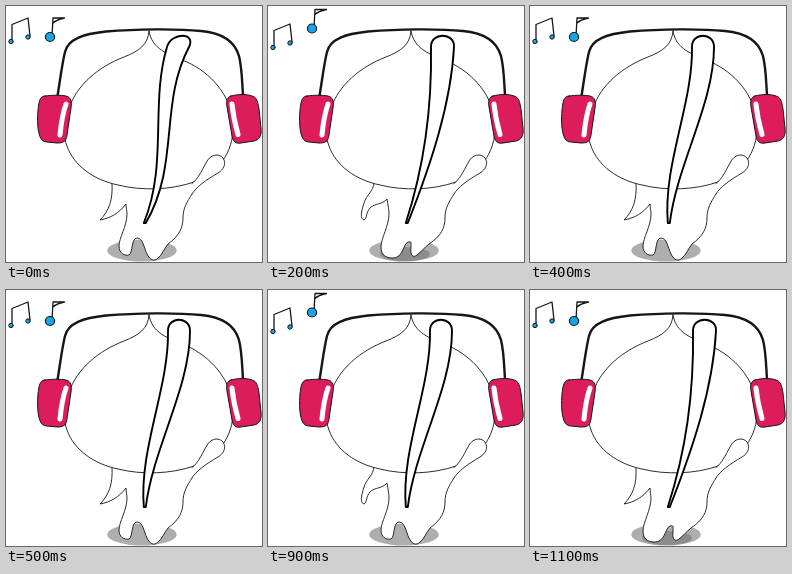
An HTML page with a canvas that plays this animation: 256 by 256 pixels, repeating every 1.2 s.

```html
<!DOCTYPE html>
<html lang="en">
<head>
<meta charset="utf-8">
<title>Dancing onion with headphones</title>
<style>
html, body { margin: 0; width: 100%; height: 100%; overflow: hidden; background: #fff; }
canvas { display: block; width: 256px; height: 256px; }
</style>
</head>
<body>
<canvas id="stage" width="256" height="256"></canvas>
<script>
const ctx = document.getElementById('stage').getContext('2d');
const INK = '#161616', PINK = '#dc1c5b', BLUE = '#16a5e6', GRAY = '#aeaeae', SHADE = '#8c8c8c';
const LOOP = 1200, HOLD = 200;

function shape(d, fill, width, ink = INK) {
  const p = new Path2D(d);
  if (fill) { ctx.fillStyle = fill; ctx.fill(p); }
  if (width) { ctx.lineWidth = width; ctx.strokeStyle = ink; ctx.stroke(p); }
}

function oval(x, y, rx, ry, fill, width = 0) {
  ctx.beginPath();
  ctx.ellipse(x, y, rx, ry, 0, 0, Math.PI * 2);
  ctx.fillStyle = fill;
  ctx.fill();
  if (width) { ctx.lineWidth = width; ctx.strokeStyle = INK; ctx.stroke(); }
}

const HEAD = 'M143 25 C142 39 133 45 118 51 C92 61 71 79 63 102 C58 118 57 130 61 140 ' +
  'C68 160 88 174 112 179 C136 185 165 184 188 176 C216 165 229 142 227 115 ' +
  'C224 89 205 67 181 56 C161 48 146 43 143 25 Z';
const ARM = 'M186 177.5 C192 173 195 166 200 157 C204 148 213 147 217 152 C221 158 217 164 212 167 C200 174 190 181 186 188';
const BAND = 'M51.5 90 C54 75 56 58 59 46 C62 33 77 28 100 25.5 C130 23 170 22.5 195 25 C217 27 229 36 233 50 C236 62 236 75 237 89';
const LEFT_CUP = 'M39 90 C46 89 55 89 60 90 C65 91 66 96 65 102 L61 129 C60 136 57 137 51 137 L41 136 C35 136 33 130 32 122 C31 111 32 102 33 97 C34 92 36 90 39 90 Z';
const RIGHT_CUP = 'M225 90 C232 88 241 88 246 90 C251 91 252 97 253 103 L255 122 C256 130 253 134 248 135 L235 137 C229 138 227 135 226 130 L221 101 C220 95 221 91 225 90 Z';
const LEFT_SHINE = 'M60 98 C56.5 108 55 118 54 129';
const RIGHT_SHINE = 'M226 98 C227 108 229 118 232 128.5';

// Each side of the hair strand: end at the top, then two control x values.
const STRANDS = [
  { l: [161, 144, 162], r: [183, 153, 174] },
  { l: [163, 164, 157], r: [186, 183, 163] },
  { l: [162, 163, 133], r: [184, 184, 147] },
  { l: [160, 138, 137], r: [183, 163, 144] }
];

function strand(i) {
  const { l, r } = STRANDS[i];
  const cap = side => side[0] + (side[0] - side[1]) * 0.25;
  shape(`M137.8 217 C${l[2]} 158 ${l[1]} 98 ${l[0]} 41 C${cap(l)} 26 ${cap(r)} 26 ${r[0]} 41 ` +
    `C${r[1]} 98 ${r[2]} 158 139.8 217 Z`, '#fff', 1.9, '#000');
}

function body(tailUp, stepped) {
  const tail = tailUp
    ? 'M106 177 C105 186 99 188 96 197 C93 206 92 213 96 214 C99 213 98 206 102 202 C107 197 114 199 119 193 C120 199 121 204 121 208'
    : 'M106 177 C107 194 103 205 94 214 C105 212 113 207 120 198 C120 202 121 205 121 208';
  const legs = stepped
    ? 'C121 220 113 232 113 241 C113 249 118 252 124 252 C135 253 135 238 140 236 C144 235 143 237 143 241 C142 250 145 252 149 249 C153 246 156 242 161 238'
    : 'C121 220 113 232 113 240 C113 247 118 250 123 249 C127 247 125 232 131 232 C137 232 138 242 141 248 C144 254 148 256 152 252 C156 249 158 243 162 238';
  shape(`${tail} ${legs} C173 230 177 222 177 212 C177 202 181 196 186 188`, '#fff', 0.9);
}

function notes(up) {
  const low = up ? 6 : 0, high = up ? -8.5 : 0;
  shape(`M6 ${35 + low} L6 ${18.5 + low} L22 ${12 + low} L24 ${30 + low}`, null, 1.3);
  oval(5, 35.5 + low, 2.2, 2.2, BLUE, 1);
  oval(22, 31 + low, 2.2, 2.2, BLUE, 1);
  shape(`M46 ${30 + high} L47 ${12 + high} L58.5 ${12 + high} C54 ${13 + high} 50 ${14 + high} 47 ${17 + high}`, null, 1.3);
  oval(44, 31 + high, 4.6, 4.5, BLUE, 1.2);
}

function draw(ms) {
  const beat = Math.floor(ms % LOOP / HOLD);
  const up = beat % 3 === 1, stepped = beat % 2 === 1;
  ctx.fillStyle = '#fff';
  ctx.fillRect(0, 0, 256, 256);
  ctx.lineJoin = ctx.lineCap = 'round';
  oval(136, 244.5, 34.8, 11, GRAY);
  if (stepped) oval(137, 248, 25, 7, SHADE);
  body(up, stepped);
  shape(HEAD, '#fff', 0.9);
  shape(ARM, '#fff', 0.9);
  shape(BAND, null, 2.4);
  shape(LEFT_CUP, PINK, 1);
  shape(RIGHT_CUP, PINK, 1);
  shape(LEFT_SHINE, null, 5, '#fff');
  shape(RIGHT_SHINE, null, 5, '#fff');
  strand(3 - Math.abs(3 - beat));
  notes(up);
}

const start = performance.now();
function tick() {
  draw(performance.now() - start);
  requestAnimationFrame(tick);
}
tick();
</script>
</body>
</html>
```
